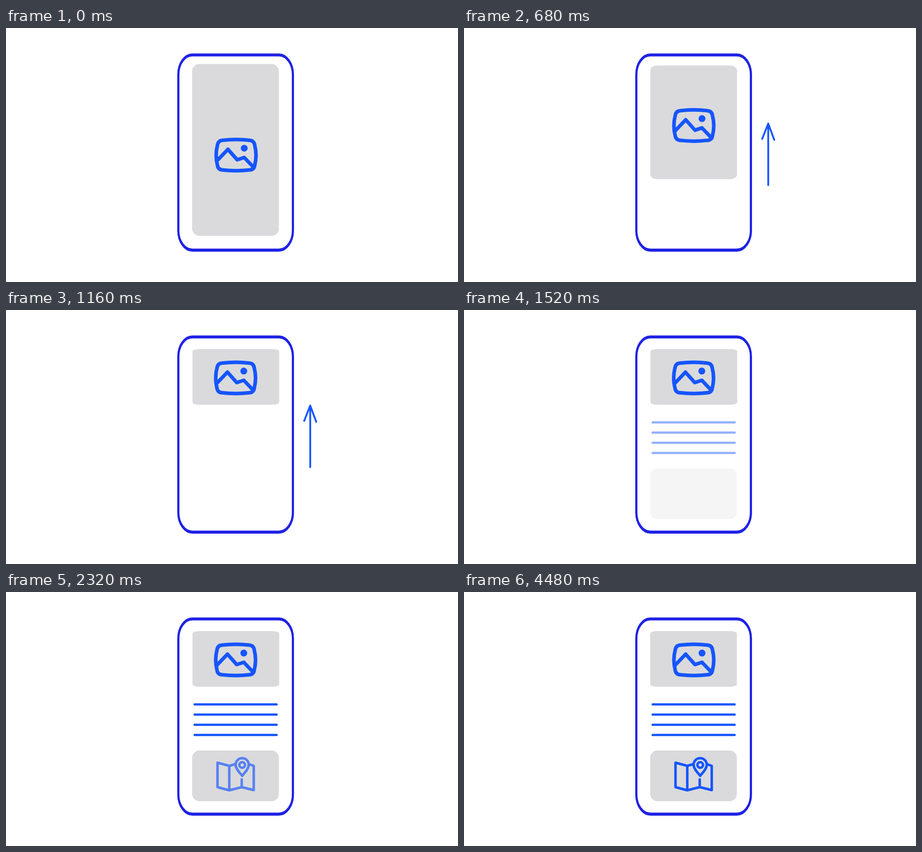
Animation of 998x561 px, one loop 5 s. Source, as an HTML page:

```html
<!DOCTYPE html>
<html lang="en">
<head>
<meta charset="utf-8">
<title>Phone layout</title>
<style>
html, body { margin: 0; width: 100%; height: 100%; overflow: hidden; background: #fff; }
svg { display: block; width: 100%; height: 100%; }
.line { fill: none; stroke: #1655ff; stroke-linecap: round; stroke-linejoin: round; }
.grey { fill: #dadadc; }
</style>
</head>
<body>
<svg viewBox="0 0 998 561">
  <rect x="380.5" y="42.5" width="253" height="307.9" rx="31" transform="scale(1 1.4)"
        fill="none" stroke="#1f22e4" stroke-width="4.8"/>
  <rect id="photo" class="grey" width="191.5"/>
  <g id="picture" class="line" stroke-width="8">
    <path d="M467 258C468 252 472 248.5 478 248Q508 244.4 538 248C544 248.5 548 252 549 258Q555 281 549 304C548 310 544 313 538 313.5Q508 317 478 313.5C472 313 468 310 467 304Q461 281 467 258Z"/>
    <path d="M467 292L490 268L510.5 291L526 286L547 308"/>
    <circle cx="526" cy="265.5" r="7.6" fill="#1655ff" stroke="none"/>
  </g>
  <path id="arrow" class="line" stroke-width="4" d="M671.7 347V211M658.3 245L671.7 211L685 247"/>
  <path id="text" class="line" stroke-width="5" d="M416.5 248.2H597.5M416.5 270.7H597.5M416.5 293.2H597.5M416.5 315.8H597.5"/>
  <rect id="card" class="grey" x="411" y="350" width="191.5" height="112" rx="16"/>
  <g id="map" class="line" stroke-width="5.5">
    <path d="M507 380L493 384L467 377V431L493 438V384M493 438L520.5 431L547 437.5V384L537.5 380.5M520.5 414V431"/>
    <path d="M521.5 406C517 400 507 391 507 381.5A14.5 14.5 0 0 1 536 381.5C536 391 526 400 521.5 406Z"/>
    <circle cx="521.5" cy="382" r="6.2"/>
  </g>
</svg>
<script>
const el = id => document.getElementById(id);
const ramp = (t, from, to) => Math.min(1, Math.max(0, (t - from) / (to - from)));
const mix = (a, b, p) => a + (b - a) * p;
const set = (id, attrs) => {
  for (const name in attrs) el(id).setAttribute(name, attrs[name]);
};

function draw(now) {
  const t = Math.floor(now % 5000 / 40) * 40;
  const p = ramp(t, 200, 1160);
  const shrink = p * p * (3 - 2 * p);
  const settle = ramp(t, 2720, 4480);
  const height = mix(379.5, 123, shrink);

  set("photo", {
    x: 411 + 0.7 * (shrink - settle),
    y: mix(79.5, 86.2, shrink),
    height,
    rx: 16,
    ry: 16 * height / 379.5
  });
  set("picture", {
    transform: `translate(${-shrink + 0.5 * settle} ${-130.7 * shrink})`
  });
  set("arrow", { opacity: ramp(t, 200, 440) - ramp(t, 1200, 1440) });
  set("text", { opacity: ramp(t, 1320, 1760) });
  set("card", { opacity: ramp(t, 1400, 1840) });
  set("map", { opacity: ramp(t, 1920, 2520) });
}

const start = performance.now();
function frame() {
  draw(performance.now() - start);
  requestAnimationFrame(frame);
}
frame();
</script>
</body>
</html>
```
